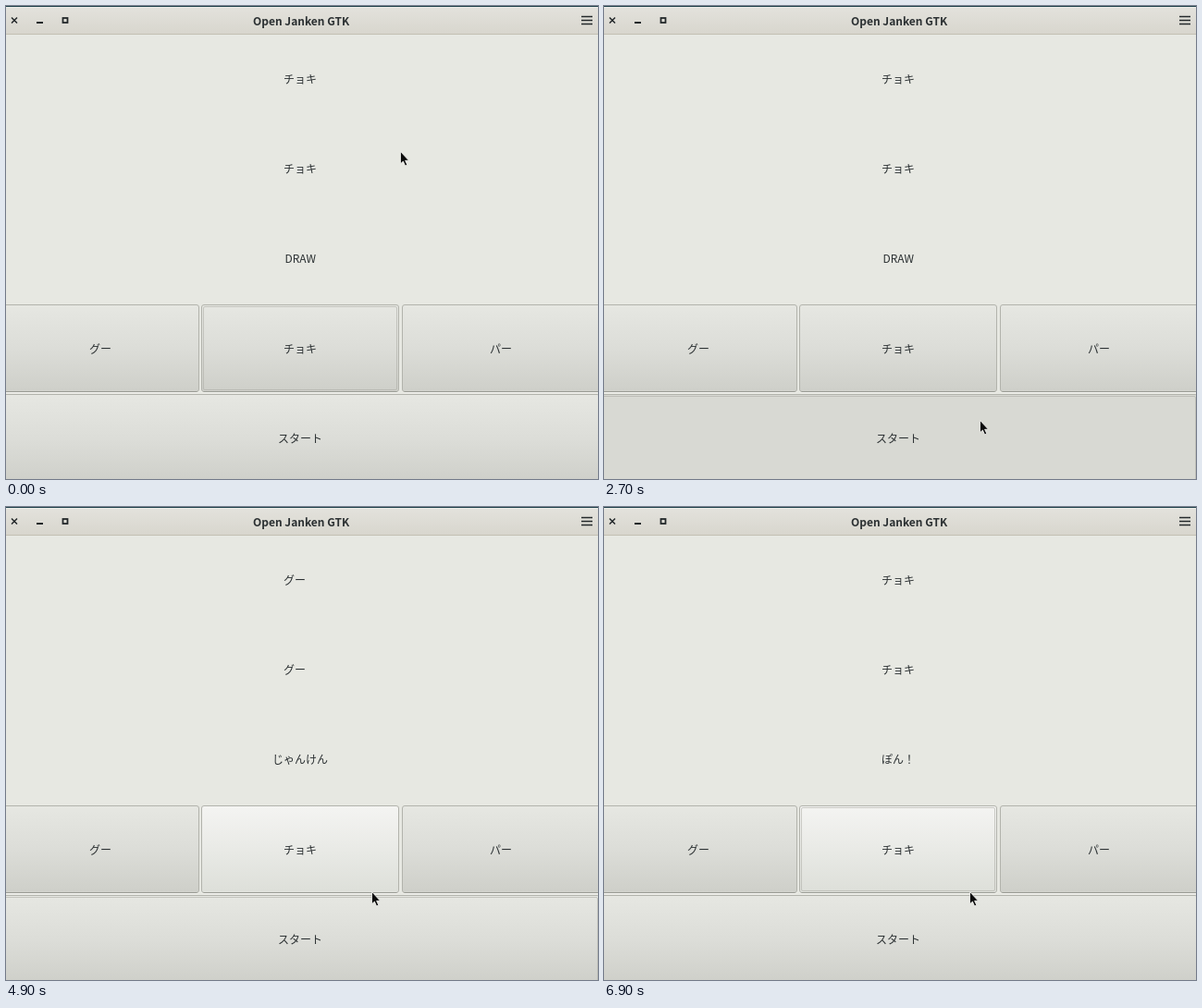
An HTML page that plays this animation: 640x512 px, repeating every 8000 ms.

```html
<!DOCTYPE html>
<html lang="ja">
<head>
<meta charset="utf-8">
<title>Open Janken GTK</title>
<style>
  html, body { margin: 0; width: 100%; height: 100%; overflow: hidden; background: #e7e8e2; }
  svg { display: block; width: 640px; height: 512px; }
  text { font: 12px "Noto Sans CJK JP", "Noto Sans CJK", "Noto Sans", sans-serif; fill: #2b3032; white-space: pre; }
  .title { font-weight: bold; }
  .face { stroke: #b2b3ac; }
  .ring { fill: none; stroke: #a9aaa3; stroke-opacity: .55; }
  .icon { fill: none; stroke: #23282a; }
</style>
</head>
<body>
<svg viewBox="0 0 640 512">
  <defs>
    <linearGradient id="bar" x2="0" y2="1"><stop stop-color="#e3e2dc"/><stop offset="1" stop-color="#d8d6ce"/></linearGradient>
    <linearGradient id="normal" x2="0" y2="1"><stop stop-color="#e6e7e2"/><stop offset=".5" stop-color="#dcddd8"/><stop offset="1" stop-color="#cecfc9"/></linearGradient>
    <linearGradient id="hover" x2="0" y2="1"><stop stop-color="#f4f4f2"/><stop offset=".5" stop-color="#e9eae6"/><stop offset="1" stop-color="#dddfd9"/></linearGradient>
  </defs>
  <rect width="640" height="512" fill="#e7e8e2"/>
  <rect y="1" width="640" height="29" fill="url(#bar)"/>
  <rect width="640" height="1" fill="#24454d"/>
  <rect y="1" width="640" height="1" fill="#efeeea"/>
  <rect y="30" width="640" height="1" fill="#c3bfb3"/>
  <g class="icon">
    <path d="M6 12.5l6 6m0-6l-6 6" stroke-width="1.5"/>
    <path d="M33 18h7" stroke-width="2"/>
    <rect x="61.5" y="13" width="5" height="5" stroke-width="1.8"/>
    <path d="M622 11.5h12m-12 4h12m-12 4h12" stroke-width="1.3"/>
  </g>
  <text class="title" x="267" y="21">Open Janken GTK</text>
  <g id="buttons"></g>
  <g id="labels"></g>
  <path id="cursor" d="M.5 .5V13.8L3.4 11.1L5.6 16L7.8 15L5.6 10.3H9.5Z" fill="#0b0b0b" stroke="#f6f6f4" stroke-width=".8"/>
</svg>
<script>
  const LOOP = 8000;
  const $ = id => document.getElementById(id);

  function add(parent, tag, attrs, text = "") {
    const el = document.createElementNS("http://www.w3.org/2000/svg", tag);
    for (const k in attrs) el.setAttribute(k, attrs[k]);
    el.textContent = text;
    return parent.appendChild(el);
  }

  function button(left, top, right, bottom, caption, tx, ty) {
    const g = $("buttons"), width = right - left, height = bottom - top;
    add(g, "rect", { x: left, y: top + 1, width, height, rx: 2.5, fill: "none", stroke: "#f3f3ef" });
    const face = add(g, "rect", { class: "face", x: left, y: top, width, height, rx: 2.5 });
    add(g, "path", { d: `M${left + 2} ${bottom}H${right - 2}`, stroke: "#999b94" });
    const ring = add(g, "rect", { class: "ring", x: left + 2, y: top + 2, width: width - 4, height: height - 4, rx: 1.5 });
    add(g, "text", { x: tx, y: ty }, caption);
    return (state, focused) => {
      face.setAttribute("fill", state === "pressed" ? "#d8d9d3" : `url(#${state})`);
      ring.setAttribute("visibility", focused ? "visible" : "hidden");
    };
  }

  button(-4.5, 323.5, 208.5, 417.5, "グー", 90, 376)("normal", false);
  button(428.5, 323.5, 644.5, 417.5, "パー", 523, 376)("normal", false);
  const choki = button(211.5, 323.5, 424.5, 417.5, "チョキ", 300, 376);
  const start = button(-3.5, 420.5, 641.5, 516.5, "スタート", 294, 473);

  const labels = [84, 181, 278].map(y => add($("labels"), "text", { y }));
  const LEFT = { "DRAW": 301.5, "最初はグー": 302, "じゃんけん": 288 };

  // time, rival's hand, player's hand, message
  const ROUNDS = [
    [0, "チョキ", "チョキ", "DRAW"],
    [2900, "グー", "グー", "最初はグー"],
    [4900, "グー", "グー", "じゃんけん"],
    [5200, "グー", "チョキ", "じゃんけん"],
    [6900, "チョキ", "チョキ", "ぽん！"]
  ];
  const within = (t, a, b) => t >= a && t < b;

  function pointer(t) {
    if (t >= 3900) return [395, 416];
    const step = Math.max(0, Math.min(9, Math.floor((t - 500) / 100) + 1));
    const p = step / 9, e = p * p * (3 - 2 * p);
    return [Math.round(426 - 20 * e), Math.round(157 + 291 * e)];
  }

  function draw(t) {
    const [x, y] = pointer(t);
    $("cursor").setAttribute("transform", `translate(${x} ${y})`);

    const overChoki = within(x, 212, 425) && within(y, 323, 419);
    const startFocus = within(t, 2700, 5100);
    choki(within(t, 5100, 5200) ? "pressed" : overChoki ? "hover" : "normal", !startFocus);
    start(within(t, 2700, 2900) ? "pressed" : y > 419 ? "hover" : "normal", startFocus);

    const round = ROUNDS.filter(r => r[0] <= t).pop();
    labels.forEach((el, i) => {
      const s = round[i + 1];
      if (el.textContent === s) return;
      el.textContent = s;
      el.setAttribute("x", LEFT[s] || 300);
    });
  }

  const began = performance.now();
  function tick() {
    draw((performance.now() - began) % LOOP);
    requestAnimationFrame(tick);
  }
  tick();
</script>
</body>
</html>
```
